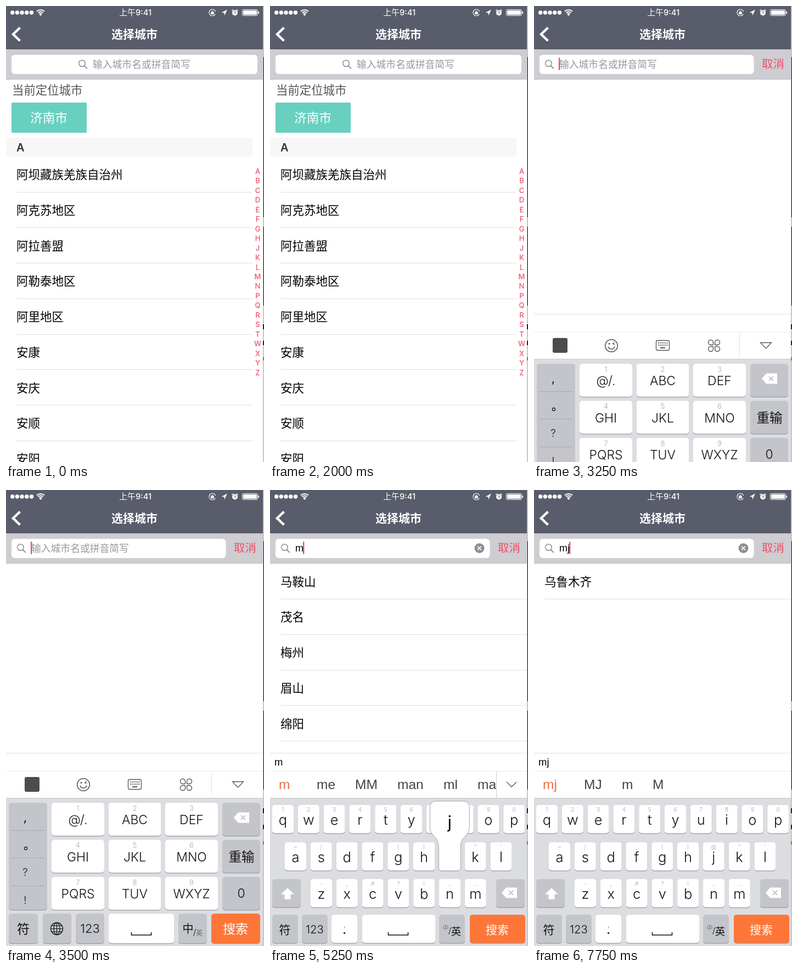
Write an HTML page with a canvas that moves like this. It is 470 px wide and 831 px high and loops after 8 s.

```html
<!DOCTYPE html>
<html lang="zh-CN">
<head>
<meta charset="utf-8">
<title>选择城市</title>
<style>
html, body { margin: 0; width: 100%; height: 100%; overflow: hidden; background: #fff; }
canvas { display: block; width: 470px; height: 831px; }
</style>
</head>
<body>
<canvas id="stage" width="470" height="831"></canvas>
<script>
const ctx = document.getElementById('stage').getContext('2d');
const UI = 'Inter, "Noto Sans CJK SC", "Noto Sans CJK", sans-serif';
const ARIAL = '"Liberation Sans", "Noto Sans CJK SC", sans-serif';
const PINK = '#ef506a', ORANGE = '#fd7638', INK = '#111', GREY = '#8e8e93';
const KEY_GREY = '#c3c5ca', PANEL = '#dcdde1';
const LOOP = 8000, STEP = 250;

const CITIES = ['阿坝藏族羌族自治州', '阿克苏地区', '阿拉善盟', '阿勒泰地区', '阿里地区', '安康', '安庆', '安顺', '安阳'];
const RESULTS = { m: ['马鞍山', '茂名', '梅州', '眉山', '绵阳'], mj: ['乌鲁木齐'] };
const CANDIDATES = {
  m: [['m', 16], ['me', 85], ['MM', 155], ['man', 232], ['ml', 316], ['ma', 378]],
  mj: [['mj', 16], ['MJ', 91], ['m', 160], ['M', 216]]
};
const LETTER_ROWS = [
  { keys: 'qwertyuiop', marks: '1234567890', x: 4, y: 574 },
  { keys: 'asdfghjkl', marks: '~/:;()@"\'', x: 27, y: 642 },
  { keys: 'zxcvbnm', marks: '-_#?!,…', x: 74, y: 709 }
];
const KEY_PITCH = 46.8;

// ---- drawing helpers ----
function box(x, y, w, h, fill, r = 0) {
  ctx.beginPath();
  ctx.roundRect(x, y, w, h, r);
  ctx.fillStyle = fill;
  ctx.fill();
}
function frame(x, y, w, h, color, r, width = 1) {
  ctx.beginPath();
  ctx.roundRect(x, y, w, h, r);
  ctx.strokeStyle = color;
  ctx.lineWidth = width;
  ctx.stroke();
}
function text(s, x, y, size, color, { align = 'left', weight = 400, font = UI } = {}) {
  ctx.font = `${weight} ${size}px ${font}`;
  ctx.textAlign = align;
  ctx.fillStyle = color;
  ctx.fillText(s, x, y);
}
const centred = (s, x, y, size, color, weight = 300) => text(s, x, y, size, color, { align: 'center', weight });
function line(points, color, width = 1) {
  ctx.beginPath();
  points.forEach(p => ctx.lineTo(...p));
  ctx.strokeStyle = color;
  ctx.lineWidth = width;
  ctx.stroke();
}
function shape(points, color) {
  ctx.beginPath();
  points.forEach(p => ctx.lineTo(...p));
  ctx.fillStyle = color;
  ctx.fill();
}
function arc(x, y, r, color, width, from = 0, to = 2 * Math.PI) {
  ctx.beginPath();
  ctx.arc(x, y, r, from, to);
  ctx.strokeStyle = color;
  ctx.lineWidth = width;
  ctx.stroke();
}
function dot(x, y, r, color) {
  ctx.beginPath();
  ctx.arc(x, y, r, 0, 2 * Math.PI);
  ctx.fillStyle = color;
  ctx.fill();
}
function cross(x, y, r, color, width) {
  line([[x - r, y - r], [x + r, y + r]], color, width);
  line([[x - r, y + r], [x + r, y - r]], color, width);
}
function key(x, y, w, h, fill = '#fff') {
  box(x, y + 1.3, w, h, '#999ba1', 5);
  box(x, y, w, h, fill, 5);
}
const rule = (x, y, w, color = '#e0e0e2') => box(x, y, w, 1, color);

// ---- page ----
function statusBar() {
  for (let i = 0; i < 5; i++) dot(11.7 + i * 8.7, 12, 3.7, '#fff');
  for (const r of [4.5, 8, 11.5]) arc(63, 17.5, r - 1, '#fff', 2, -2.3, -0.84);
  dot(63, 16, 1.7, '#fff');
  centred('上午9:41', 235.8, 17, 14.8, '#fff', 500);

  arc(376, 12, 6, '#fff', 1.2, 0.5, 6);
  box(373.2, 11, 5.6, 4.3, '#fff');
  arc(376, 11, 1.8, '#fff', 1, Math.PI, 0);
  shape([[403, 6.5], [392.5, 12], [397.5, 12.5], [398, 17.5]], '#fff');
  dot(417, 12.5, 5, '#fff');
  line([[417, 9.5], [417, 13], [419.5, 13]], '#595c6a', 1.2);
  line([[411.5, 9], [414, 6.5]], '#fff', 1.6);
  line([[420, 6.5], [422.5, 9]], '#fff', 1.6);
  frame(430.5, 6.5, 28, 11, '#fff', 2);
  box(432, 8, 25, 8, '#fff', 1);
  box(459.5, 10, 1.7, 4, '#fff', 1);
}
function header(searching, typed, cursorOn) {
  box(0, 0, 468, 79, '#595c6a');
  statusBar();
  line([[25.5, 39.5], [13, 51.5], [25.5, 63.5]], '#fff', 4.5);
  centred('选择城市', 234, 59, 21, '#fff', 700);

  box(0, 79, 468, 55, '#cecdd2');
  rule(0, 133, 468, '#bcbcc0');
  box(10, 89, searching ? 390.5 : 448, 35, '#fff', 6);
  const x = searching ? 26.5 : 138.5;
  arc(x, 104.5, 5.8, GREY, 1.5);
  line([[x + 4, 109], [x + 9.5, 114]], GREY, 1.8);
  if (!typed) text('输入城市名或拼音简写', searching ? 46 : 158, 112.5, 17.8, '#98989d');
  if (!searching) return;

  text('取消', 415, 112.5, 20.6, PINK);
  text(typed, 46, 112, 18, '#000', { font: ARIAL });
  if (cursorOn) box(typed ? 45 + ctx.measureText(typed).width : 45, 94, 2.4, 23, PINK, 1);
  if (typed) {
    dot(381.5, 106, 9, GREY);
    cross(381.5, 106, 3.4, '#fff', 1.7);
  }
}
function rows(names, y, width) {
  names.forEach((name, i) => {
    const top = y + i * 64.75;
    text(name, 19, top + 8, 21.5, '#000');
    rule(19, Math.floor(top + 32), width);
  });
}
function cityList() {
  text('当前定位城市', 11, 161, 21.4, '#555');
  box(10, 176, 137, 55, '#69d0c0', 1);
  text('济南市', 44, 212, 22.7, '#fff', { weight: 300 });
  box(0, 240, 449, 35, '#f7f7f7');
  text('A', 19, 265, 20, '#333', { weight: 600 });
  rows(CITIES, 307, 430);
  [...'ABCDEFGHJKLMNPQRSTWXYZ'].forEach((c, i) => centred(c, 458.5, 305.7 + i * 17.48, 13, PINK, 500));
}
function backdropEdge() {
  box(468, 0, 1, 831, '#b8b8ba');
  box(469, 0, 1, 831, '#d8d8da');
  box(469, 93, 1, 292, '#222');
  box(469, 402, 1, 144, '#222');
  box(468, 580, 2, 9, '#222');
  box(468, 610, 2, 8, '#222');
  box(468, 640, 2, 6, '#d9602f');
}

// ---- keyboards ----
function backspace(x, y) {
  shape([[x - 14, y], [x - 6, y - 9.5], [x + 14, y - 9.5], [x + 14, y + 9.5], [x - 6, y + 9.5]], '#fff');
  cross(x + 3, y, 4, KEY_GREY, 1.8);
}
const spaceMark = x => line([[x, 806], [x, 811], [x + 36, 811], [x + 36, 806]], INK, 1.6);

function toolbar() {
  const c = '#555';
  box(34, 523, 27, 27, '#4c4c4c', 3);
  arc(141, 537, 11.3, c, 1.5);
  arc(141, 537, 6.3, c, 1.5, 0.2, 2.8);
  dot(137, 533.5, 1.5, c);
  line([[147, 531], [143.5, 533.5], [147, 535]], c, 1.3);
  frame(222.5, 527.5, 24, 18, c, 3, 1.3);
  for (let i = 0; i < 10; i++) box(226.5 + (i % 5) * 3.7, 531 + (i > 4 ? 4 : 0), 2, 2, c);
  box(230, 540, 9, 2, c);
  // Four petals, each with a sharp corner towards the middle.
  [[317.5, 526.5], [329.5, 526.5], [329.5, 538.5], [317.5, 538.5]].forEach(([x, y], i) => {
    const corners = [4.5, 4.5, 4.5, 4.5];
    corners[(i + 2) % 4] = 1;
    frame(x, y, 9, 9, c, corners, 1.4);
  });
  box(374, 516, 1, 40, '#ddd');
  line([[422.5, 542], [412.5, 531.5], [432.5, 531.5], [422.5, 542]], c, 1.3);
}
function candidates(typed) {
  text(typed, 8, 502, 18.5, '#000', { font: ARIAL });
  ctx.save();
  ctx.beginPath();
  ctx.rect(0, 512, typed === 'm' ? 412 : 468, 49);
  ctx.clip();
  CANDIDATES[typed].forEach(([word, x], i) =>
    text(word, x, 545, 24.5, i ? '#444' : '#ec7040', { font: ARIAL }));
  ctx.restore();
  if (typed === 'm') {
    box(412, 512, 1, 49, '#ccc');
    line([[431, 532], [440, 541], [449, 532]], '#555', 1.3);
  }
}
function ninePad(pressed) {
  key(5, 570, 70, 195, KEY_GREY);
  for (const y of [620, 670, 721]) rule(10, y, 60, '#aaacb2');
  centred(',', 35, 604, 21, INK, 400);
  arc(36, 653, 2.6, INK, 1.2);
  centred('?', 35, 703, 19, INK);
  centred('!', 35, 754, 19, INK);
  ['@/.', 'ABC', 'DEF', 'GHI', 'JKL', 'MNO', 'PQRS', 'TUV', 'WXYZ'].forEach((label, i) => {
    const x = 83 + (i % 3) * 103.5, y = 570 + Math.floor(i / 3) * 67.5;
    key(x, y, 96, 60);
    centred(i + 1, x + 48, y + 14.5, 12.5, '#a5a5a8');
    centred(label, x + 48, y + 39, 23, INK);
  });
  for (let i = 0; i < 3; i++) key(394, 570 + i * 67.5, 69, 60, KEY_GREY);
  backspace(429, 597);
  centred('重输', 429, 676.5, 23.5, INK);
  centred('0', 428.5, 743, 23, INK);

  key(5, 772, 53, 54, KEY_GREY);
  centred('符', 31.5, 808, 23, INK);
  key(67, 772, 52, 54, KEY_GREY);
  arc(92.5, 799.5, 11, INK, 1.3);
  for (const y of [794, 799.5, 805]) line([[82.5, y], [102.5, y]], INK, 1.1);
  line([[92.5, 788.5], [92.5, 810.5]], INK, 1.1);
  ctx.beginPath();
  ctx.ellipse(92.5, 799.5, 5.5, 11, 0, 0, 2 * Math.PI);
  ctx.stroke();
  key(127, 772, 52, 54, KEY_GREY);
  centred('123', 153, 807, 22, INK);
  key(187, 772, 119, 54);
  spaceMark(228.5);
  key(314, 772, 52, 54, pressed ? '#b2b4ba' : KEY_GREY);
  centred('中', 331.5, 807, 20, INK);
  centred('/', 343.5, 811, 15, INK);
  centred('英', 352, 812, 12, '#666');
  key(374, 772, 89, 54, ORANGE);
  centred('搜索', 418, 807.5, 23, '#fff');
}
function keyPopup(letter) {
  const row = LETTER_ROWS.find(r => r.keys.includes(letter));
  const cx = row.x + row.keys.indexOf(letter) * KEY_PITCH + 19.5, y = row.y;
  ctx.beginPath();
  ctx.moveTo(cx, y - 75);
  ctx.arcTo(cx + 36, y - 75, cx + 36, y - 60, 10);
  ctx.lineTo(cx + 36, y - 27);
  ctx.bezierCurveTo(cx + 36, y - 12, cx + 20, y - 10, cx + 20, y + 8);
  ctx.arcTo(cx + 20, y + 52, cx, y + 52, 5);
  ctx.arcTo(cx - 20, y + 52, cx - 20, y + 8, 5);
  ctx.lineTo(cx - 20, y + 8);
  ctx.bezierCurveTo(cx - 20, y - 10, cx - 36, y - 12, cx - 36, y - 27);
  ctx.arcTo(cx - 36, y - 75, cx, y - 75, 10);
  ctx.closePath();
  ctx.fillStyle = '#fff';
  ctx.fill();
  ctx.strokeStyle = '#a2a4a9';
  ctx.lineWidth = 1;
  ctx.stroke();
  centred(letter, cx, y - 26, 31, '#000', 400);
}
function letterPad(pressed) {
  for (const { keys, marks, x, y } of LETTER_ROWS) {
    [...keys].forEach((c, i) => {
      const left = x + i * KEY_PITCH;
      key(left, y, 39, 51.5);
      centred(marks[i], left + 19.5, y + 12, 10, '#a0a0a4');
      centred(c, left + 19.5, y + 36, 25.5, INK);
    });
  }
  key(4, 709, 52, 51.5, KEY_GREY);
  shape([[32, 725], [44, 737], [37.5, 737], [37.5, 746], [26.5, 746], [26.5, 737], [20, 737]], '#fff');
  key(412, 709, 52, 51.5, KEY_GREY);
  backspace(436, 734);

  key(4, 774, 47, 51.5, KEY_GREY);
  centred('符', 27, 808.5, 21, INK);
  key(58, 774, 47, 51.5, KEY_GREY);
  centred('123', 81.5, 808, 20.5, INK);
  key(112, 774, 47, 51.5);
  centred(',', 136, 796, 14, '#777');
  centred('.', 135.5, 809, 25, INK, 400);
  key(168, 774, 133, 51.5);
  spaceMark(215.5);
  key(308, 774, 47, 51.5, KEY_GREY);
  centred('中', 320, 802, 11, '#777');
  centred('/', 327.5, 808, 15, INK);
  centred('英', 339, 810.5, 18.5, INK);
  key(364, 774, 101, 51.5, ORANGE);
  centred('搜索', 414, 808.5, 21, '#fff');
  if (pressed) keyPopup(pressed);
}
function inputPanel(t, typed) {
  ctx.save();
  ctx.translate(0, t < 3500 ? 82 : 0);
  box(0, 479, 468, 82, '#fff');
  rule(0, 479, 468, '#dedede');
  rule(0, 512, 468, '#ebebeb');
  box(0, 561, 468, 270, PANEL);
  rule(0, 561, 468, '#c6c7ca');
  typed ? candidates(typed) : toolbar();
  if (t < 4750) ninePad(t >= 4500);
  else letterPad({ 5000: 'm', 5250: 'j' }[t]);
  ctx.restore();
}

function draw(now) {
  const t = Math.floor((now % LOOP) / STEP) * STEP;
  const searching = t >= 3250;
  const typed = t >= 5500 ? 'mj' : t >= 5250 ? 'm' : '';
  const blinkStart = t >= 5500 ? 5500 : t >= 5250 ? 5250 : 3250;

  box(0, 0, 470, 831, '#fff');
  if (searching) rows(RESULTS[typed] || [], 166.5, 449);
  else cityList();
  header(searching, typed, (t - blinkStart) % 1000 < 500);
  if (searching) inputPanel(t, typed);
  backdropEdge();
}

const start = performance.now();
function tick() {
  draw(performance.now() - start);
  requestAnimationFrame(tick);
}
tick();
</script>
</body>
</html>
```
